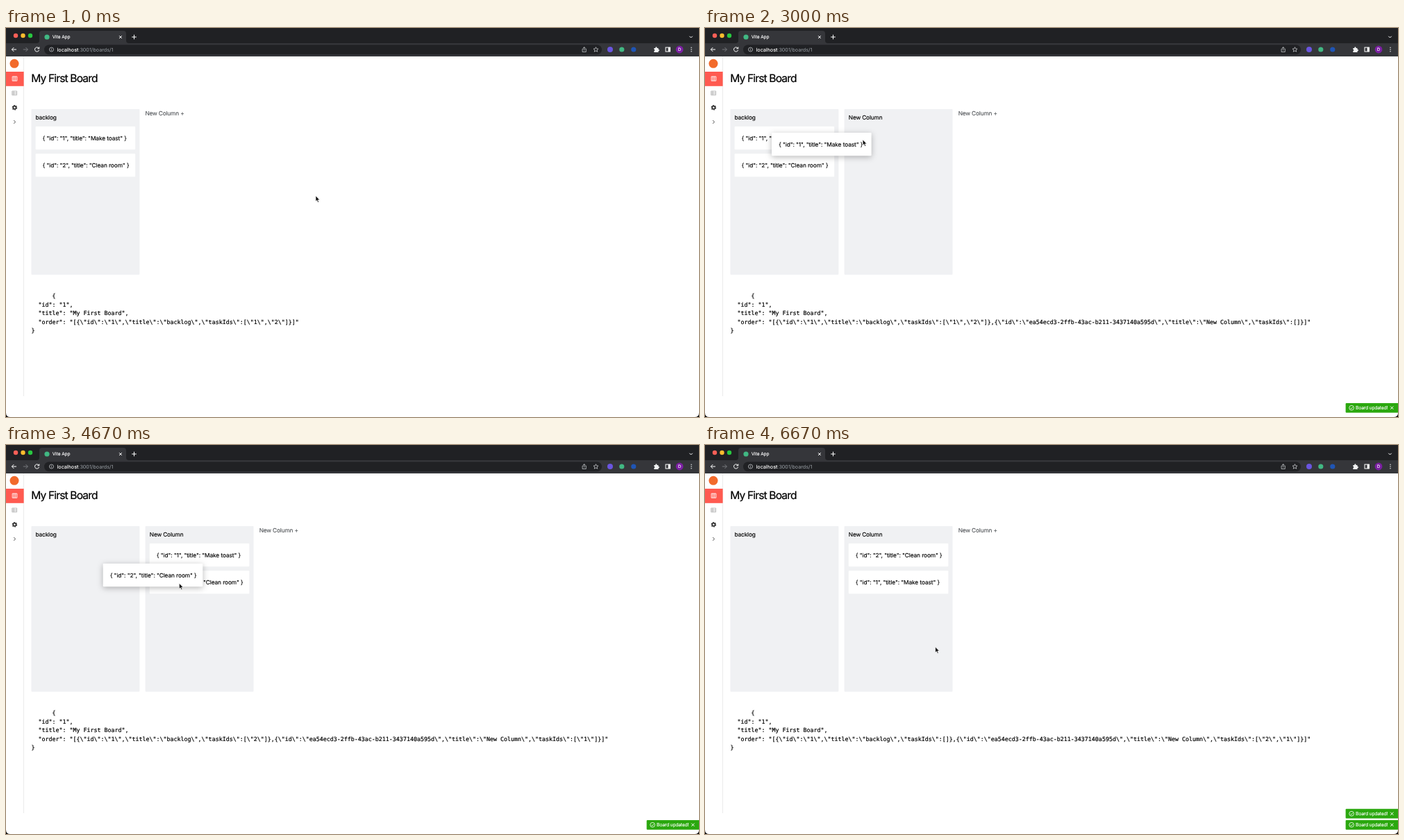
An HTML page that plays this animation: 998x561 px, repeating every 7.4 s.

```html
<!DOCTYPE html>
<html lang="en">
<head>
<meta charset="utf-8">
<title>Board</title>
<style>
  html, body { margin: 0; width: 100%; height: 100%; overflow: hidden; background: #fff; }
  svg { display: block; width: 998px; height: 561px; }
  text {
    font: 8.32px Inter, Roboto, sans-serif; letter-spacing: -.17px; white-space: pre;
    text-rendering: geometricPrecision; stroke: #000; stroke-width: .14px;
  }
  .title { font-size: 15.6px; letter-spacing: -.86px; stroke-width: .22px; }
  .mono { font: 8.32px "DejaVu Sans Mono", monospace; letter-spacing: 0; stroke-width: .2px; }
  .ui { font-size: 6.5px; letter-spacing: -.05px; fill: #fff; stroke: #fff; }
  .url { font-size: 7.2px; letter-spacing: 0; fill: #9aa0a6; stroke: none; }
  .host { fill: #fff; stroke: #fff; }
  .toast text { font-size: 6.8px; letter-spacing: -.22px; fill: #fff; stroke: #fff; }
  .add { fill: #55585c; stroke: #55585c; }
  .card text { letter-spacing: -.09px; }
  .line { fill: none; stroke: #fff; }
  .lifted { filter: drop-shadow(0 2px 4px rgba(0, 0, 0, .28)); }
</style>
</head>
<body>
<svg viewBox="0 0 998 561">
  <defs>
    <g id="toast" class="toast">
      <rect width="76" height="13.8" rx="1" fill="#2ba80f"/>
      <circle cx="8.5" cy="6.9" r="3.4" class="line" stroke-width=".8"/>
      <path d="M6.7 7l1.4 1.4 2.5-2.8" class="line" stroke-width=".8"/>
      <text x="14.4" y="9.4">Board updated!</text>
      <path d="M64.6 4.8l4.2 4.2m0-4.2l-4.2 4.2" class="line" stroke-width="1"/>
    </g>
  </defs>

  <!-- browser window -->
  <rect width="998" height="41" fill="#202124"/>
  <path d="M44 22q4 0 4-4V8q0-4 4-4h117q4 0 4 4v10q0 4 4 4h821v19H0V22z" fill="#35363a"/>
  <rect x="55" y="24.2" width="803" height="14" rx="7" fill="#202124"/>
  <circle cx="14" cy="11" r="3.2" fill="#ff5f57"/>
  <circle cx="24.5" cy="11" r="3.2" fill="#febc2e"/>
  <circle cx="35" cy="11" r="3.2" fill="#28c840"/>
  <circle cx="59" cy="13" r="3.6" fill="#41b883"/>
  <text class="ui" x="66.7" y="15.3">Vite App</text>
  <g class="line" stroke-width="1">
    <path d="M163 11.2l3.8 3.8m0-3.8l-3.8 3.8M181.2 13h6.6m-3.3-3.3v6.6M984.3 11.8l2.2 2.2 2.2-2.2"/>
    <path d="M15 31H8.4m3-3l-3 3 3 3"/>
    <path d="M24.8 31h6.6m-3-3l3 3-3 3" stroke="#77797d"/>
    <path d="M47.2 29.2a3.1 3.1 0 1 0 .4 2.6M47.8 27.4v2.4h-2.4"/>
  </g>
  <g class="line" style="stroke:#c4c7cb" stroke-width=".8">
    <circle cx="65.5" cy="31" r="3"/>
    <path d="M65.5 30.6v2M65.5 29.2v.7"/>
    <path d="M831.4 30h-1.3v4.4h5.2V30H834M832.7 32.5v-5m-1.5 1.5l1.5-1.5 1.5 1.5"/>
    <path d="M849.5 27.6l1 2.3 2.5.2-1.9 1.7.6 2.4-2.2-1.3-2.2 1.3.6-2.4-1.9-1.7 2.5-.2z"/>
  </g>
  <text class="url" x="73.6" y="33.6"><tspan class="host">localhost</tspan>:3001/boards/1</text>
  <circle cx="870" cy="31" r="4" fill="#6a55e0"/>
  <circle cx="886.8" cy="31" r="3.6" fill="#41b883"/>
  <circle cx="903.8" cy="31" r="3.6" fill="#1f55b5"/>
  <path d="M933.3 29h2v-.6a1.1 1.1 0 0 1 2.2 0v.6h2v2h.4a1.1 1.1 0 0 1 0 2.2h-.4v1.8h-6.2v-2a1 1 0 0 0 0-2z" fill="#f1f3f4"/>
  <rect x="950" y="28" width="6.4" height="6" class="line" stroke-width="1"/>
  <rect x="953.6" y="28" width="2.8" height="6" fill="#fff"/>
  <circle cx="970" cy="31" r="5.4" fill="#7b1fa2"/>
  <text class="ui" x="970" y="33.2" text-anchor="middle" style="font-size:6px">D</text>
  <g fill="#e8eaed"><circle cx="987" cy="28.3" r=".8"/><circle cx="987" cy="31" r=".8"/><circle cx="987" cy="33.7" r=".8"/></g>

  <!-- sidebar -->
  <path d="M25.5 41v490" stroke="#e6e6e6" stroke-width=".8"/>
  <circle cx="12" cy="51.3" r="6.5" fill="#f26a2b"/>
  <rect y="63" width="25.6" height="20.8" fill="#ff5a50"/>
  <path d="M9.2 70h6.6v6.2H9.2zM11.4 70v6m2.2-6v6" class="line" stroke-width=".9"/>
  <path d="M8.8 91h6.8v5.8H8.8zM8.8 93h6.8m-6.8 2h6.8M11 91v5.8" fill="none" stroke="#a6a6a6" stroke-width=".7"/>
  <circle cx="12.4" cy="114.8" r="2.1" fill="none" stroke="#333" stroke-width="1.7"/>
  <circle cx="12.4" cy="114.8" r="3.2" fill="none" stroke="#333" stroke-width="1.2" stroke-dasharray="1.7 1.65"/>
  <path d="M11.3 133.2l2.3 2.3-2.3 2.3" fill="none" stroke="#333" stroke-width=".9"/>

  <!-- board -->
  <text class="title" x="36.2" y="78">My First Board</text>
  <rect x="36.4" y="117" width="156" height="238.7" rx="1" fill="#f0f1f3"/>
  <text x="42.6" y="132.4">backlog</text>
  <g id="column">
    <rect x="200.6" y="117" width="156" height="238.7" rx="1" fill="#f0f1f3"/>
    <text x="206.8" y="132.4">New Column</text>
  </g>
  <text id="add" class="add" y="126.3">New Column +</text>
  <g id="cards"></g>

  <text class="mono" x="36.4" y="389.2">      {</text>
  <text class="mono" x="36.4" y="401.7">  "id": "1",</text>
  <text class="mono" x="36.4" y="414.2">  "title": "My First Board",</text>
  <text class="mono" x="36.4" y="426.7" id="order"></text>
  <text class="mono" x="36.4" y="439.2">}</text>

  <use href="#toast" id="low" x="922.6" y="540.9"/>
  <use href="#toast" id="high" x="922.6" y="524.8"/>

  <path d="M0 555v6h6q-6 0-6-6zM998 555v6h-6q6 0 6-6z" fill="#000"/>

  <g id="cursor" stroke-linejoin="round">
    <path id="arrow" d="M0 0v8l1.8-1.6 1.3 3 1.4-.6-1.3-2.9h2.5z" fill="#111" stroke="#fff" stroke-width=".6"/>
    <path id="hand" d="M-1.4 1.2v-4q0-.8.7-.8t.7.8V-.6q2.9 0 3.4 1.2v2.2L2.4 5.4h-3.6L-3 2.4q-.4-1 .4-1.2z" fill="#fff" stroke="#222" stroke-width=".8"/>
    <path id="beam" d="M-1.7-3.8q1.7 0 1.7.9v5.8q0 .9-1.7.9M1.7-3.8q-1.7 0-1.7.9M0 2.9q0 .9 1.7.9M-1 .9h2" fill="none" stroke="#333" stroke-width=".8"/>
    <path id="move" d="M0-4l1.6 1.8H.6v1.6h1.6v-1L4 0 2.2 1.6v-1H.6v1.6h1L0 4l-1.6-1.8h1V.6h-1.6v1L-4 0l1.8-1.6v1h1.6v-1.6h-1z" fill="#111" stroke="#111" stroke-width=".3"/>
  </g>
</svg>
<script>
const FPS = 15, LOOP = 7400;
const $ = id => document.getElementById(id);
const show = (el, on) => el.style.display = on ? '' : 'none';
const titles = { 1: 'Make toast', 2: 'Clean room' };

// all times below are in ticks of 1/15 s
const path = [
  [2, 446, 242], [6, 281, 174.5], [8, 281, 174.5], [14, 236, 127.5], [16, 236, 127.5],
  [17, 236.6, 128.8], [26, 236.6, 128.8], [35, 235.8, 140.6], [38, 172, 151], [39, 173.7, 152],
  [42, 173.7, 152], [49, 309.5, 175], [54, 311, 178], [62, 152.3, 170.4], [63, 152.3, 170.4],
  [75, 308, 217], [78, 305.7, 217.7], [80, 303, 210.5], [82, 303, 210.5], [88, 301, 166],
  [90, 301, 166], [100, 331.7, 291.2]
];
const shapes = [
  [0, 'arrow'], [13, 'hand'], [27, 'beam'], [36, 'arrow'], [39, 'move'], [43, 'arrow'],
  [60, 'move'], [64, 'arrow'], [80, 'move'], [83, 'arrow'], [91, 'move'], [95, 'arrow']
];
const layouts = [
  [0, [1, 2]], [27, [1, 2], []], [46, [2], [1]], [69, [], [1, 2]], [86, [], [2, 1]]
];
const saved = [
  [0, [1, 2]], [32, [1, 2], []], [55, [2], [1]], [77, [], [1, 2]], [92, [], [2, 1]]
];
const drags = [
  { from: 43, to: 54, id: 1, x: 42.6, y: 142 },
  { from: 64, to: 75, id: 2, x: 42.6, y: 142 },
  { from: 83, to: 91, id: 2, x: 206.8, y: 181.2 }
];
const toasts = [[33, 66], [55, 88], [77, 111], [92, 111]];

function makeCard(extra = '') {
  const g = document.createElementNS('http://www.w3.org/2000/svg', 'g');
  g.setAttribute('class', 'card ' + extra);
  g.innerHTML = '<rect width="143.6" height="33.2" rx="1" fill="#fff"/><text x="10.2" y="19.6"></text>';
  $('cards').append(g);
  return g;
}
const cards = { 1: makeCard(), 2: makeCard() };
const lifted = makeCard('lifted');

function place(card, id, x, y) {
  card.lastChild.textContent = `{ "id": "${id}", "title": "${titles[id]}" }`;
  card.setAttribute('transform', `translate(${x} ${y})`);
}

const current = (list, f) => list.filter(k => k[0] <= f).pop();

function cursorAt(f) {
  const i = path.findIndex(k => k[0] > f);
  if (i === 0) return path[0].slice(1);
  if (i < 0) return path[path.length - 1].slice(1);
  const [a, b] = [path[i - 1], path[i]];
  const p = (f - a[0]) / (b[0] - a[0]);
  const e = p * p * (3 - 2 * p);
  return [a[1] + (b[1] - a[1]) * e, a[2] + (b[2] - a[2]) * e];
}

function orderText([, first, second]) {
  const col = (id, title, ids) => ({ id, title, taskIds: ids.map(String) });
  const cols = [col('1', 'backlog', first)];
  if (second) cols.push(col('ea54ecd3-2ffb-43ac-b211-3437140a595d', 'New Column', second));
  return '  "order": ' + JSON.stringify(JSON.stringify(cols));
}

function draw(f) {
  const [x, y] = cursorAt(f);
  const shape = current(shapes, f)[1];
  $('cursor').setAttribute('transform', `translate(${x} ${y})`);
  for (const name of ['arrow', 'hand', 'beam', 'move']) show($(name), name === shape);

  const [, first, second] = current(layouts, f);
  show($('column'), second);
  $('add').setAttribute('x', second ? 364.7 : 200.4);
  [first, second || []].forEach((ids, c) => ids.forEach((id, r) =>
    place(cards[id], id, 42.6 + c * 164.2, 142 + r * 39.2)));

  const drag = drags.find(d => f >= d.from && f < d.to);
  show(lifted, drag);
  if (drag) {
    const [gx, gy] = cursorAt(drag.from - 1);
    place(lifted, drag.id, drag.x + x - gx, drag.y + y - gy);
  }

  $('order').textContent = orderText(current(saved, f));
  const count = toasts.filter(([a, b]) => f >= a && f < b).length;
  show($('low'), count > 0);
  show($('high'), count > 1);
}

const start = performance.now();
function loop() {
  const t = (performance.now() - start) % LOOP;
  draw(Math.floor(t * FPS / 1000 + .1));
  requestAnimationFrame(loop);
}
loop();
</script>
</body>
</html>
```
